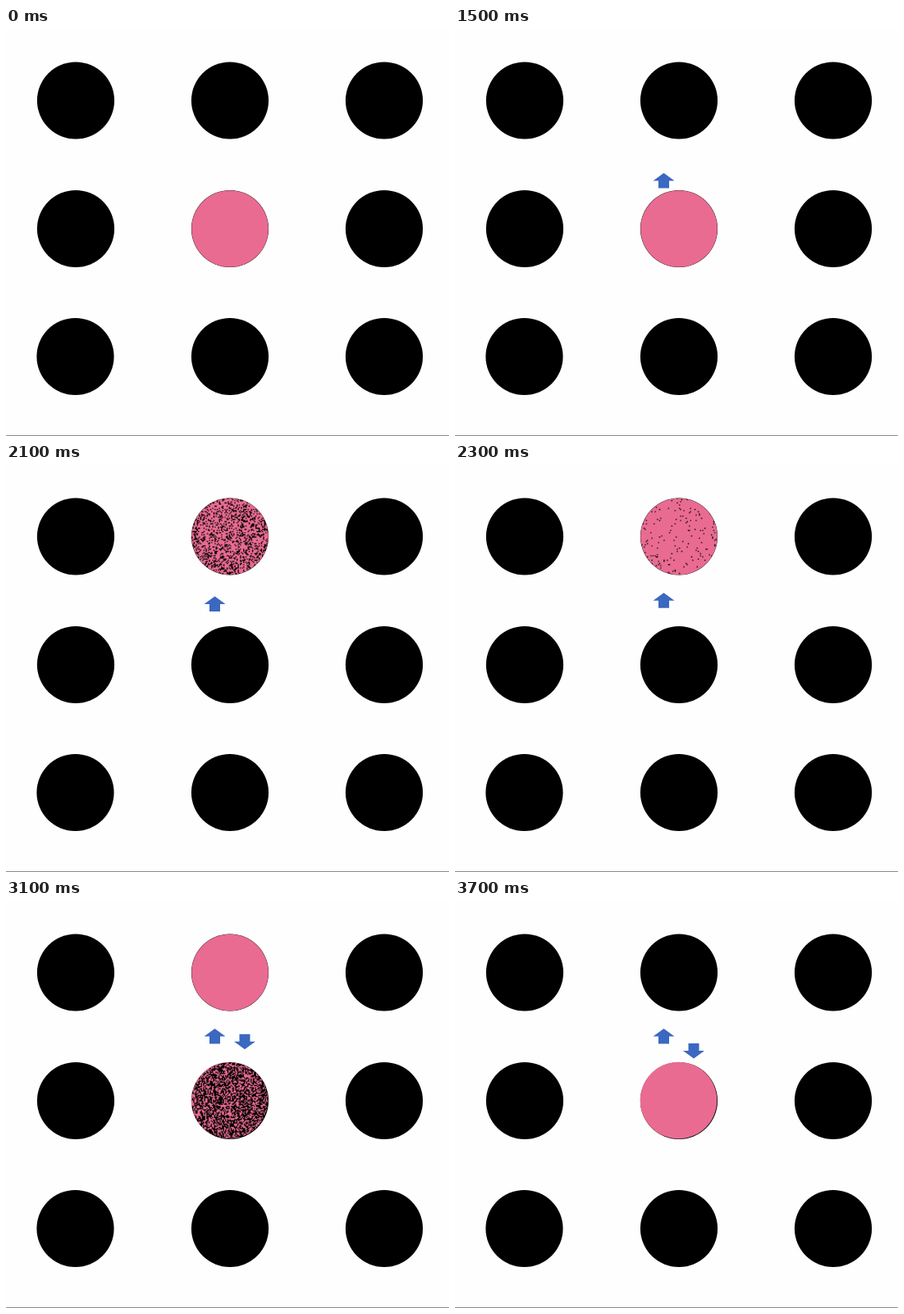
These frames come from a looping animation (540 px wide and 498 px high, 4700 ms). An HTML page with a canvas:

```html
<!DOCTYPE html>
<html lang="en">
<head>
<meta charset="utf-8">
<title>Dot swap</title>
<style>
  html, body { margin: 0; width: 100%; height: 100%; overflow: hidden; background: #fefefe; }
  canvas { display: block; width: 540px; height: 498px; }
</style>
</head>
<body>
<canvas id="stage" width="540" height="498"></canvas>
<script>
const LOOP = 4700, STEP = 100;
const PINK = '#e96b92', BLACK = '#000', BLUE = '#3b68c0';
const COLS = [85, 273, 461], ROWS = [88.5, 245, 401];
const R = 47.1, GRAINS = 70;

const ctx = document.getElementById('stage').getContext('2d');
const grain = document.createElement('canvas');
grain.width = grain.height = GRAINS;
const gctx = grain.getContext('2d');

const clamp = v => Math.min(1, Math.max(0, v));
const ease = v => { v = clamp(v); return v * v * (3 - 2 * v); };

function random(seed) {
  return () => {
    seed = (seed + 0x6d2b79f5) | 0;
    let n = Math.imul(seed ^ (seed >>> 15), 1 | seed);
    n = (n + Math.imul(n ^ (n >>> 7), 61 | n)) ^ n;
    return ((n ^ (n >>> 14)) >>> 0) / 4294967296;
  };
}

function disc(x, y, r, color) {
  ctx.beginPath();
  ctx.arc(x, y, r, 0, Math.PI * 2);
  ctx.fillStyle = color;
  ctx.fill();
}

// Pink grains cover the black disc until it is fully pink.
function dissolve(x, y, amount, seed) {
  if (amount <= 0) return;
  if (amount >= 1) return disc(x, y, R - 0.3, PINK);
  const rnd = random(seed);
  gctx.clearRect(0, 0, GRAINS, GRAINS);
  gctx.fillStyle = PINK;
  for (let i = 0; i < GRAINS * GRAINS; i++) {
    if (rnd() < amount) gctx.fillRect(i % GRAINS, Math.floor(i / GRAINS), 1, 1);
  }
  ctx.save();
  ctx.beginPath();
  ctx.arc(x, y, R - 0.3, 0, Math.PI * 2);
  ctx.clip();
  ctx.drawImage(grain, x - R, y - R, R * 2, R * 2);
  ctx.restore();
}

// dir is 1 for an upward arrow, -1 for a downward one.
function arrow(x, tip, dir) {
  const points = [[0, 0], [13, 9.5], [6.5, 9.5], [6.5, 18.5], [-6.5, 18.5], [-6.5, 9.5], [-13, 9.5]];
  ctx.beginPath();
  for (const [dx, dy] of points) ctx.lineTo(x + dx, tip + dy * dir);
  ctx.closePath();
  ctx.fillStyle = BLUE;
  ctx.fill();
}

function draw(ms) {
  ctx.fillStyle = '#fefefe';
  ctx.fillRect(0, 0, 540, 498);
  ctx.fillStyle = '#8c8c8c';
  ctx.fillRect(0, 497, 540, 1);

  ROWS.forEach((y, r) => COLS.forEach((x, c) =>
    disc(r === 2 && c === 0 ? x - 0.5 : x, y, R, BLACK)));

  const up = (ms - 1500) / 1000, down = (ms - 2700) / 1000;
  const fill = s => clamp(1.27 * s - 0.05);
  const [, x] = COLS, [top, mid] = ROWS;

  if (ms < 3600) dissolve(x, top, fill(up), 11);
  if (ms < 2000) disc(x, mid, R - 0.3, PINK);
  else dissolve(x - 0.5, mid - 0.4, fill(down), 29);

  if (up >= 0) arrow(254.5, 177 - 20 * ease(up / 0.87), 1);
  if (down >= 0) arrow(291, 173.5 + 20 * ease(down / 0.87), -1);
}

let start = null, shown = -1;
function tick(now) {
  if (start === null) start = now;
  const ms = Math.floor(((now - start) % LOOP) / STEP) * STEP;
  if (ms !== shown) draw(shown = ms);
  requestAnimationFrame(tick);
}
draw(0);
requestAnimationFrame(tick);
</script>
</body>
</html>
```
